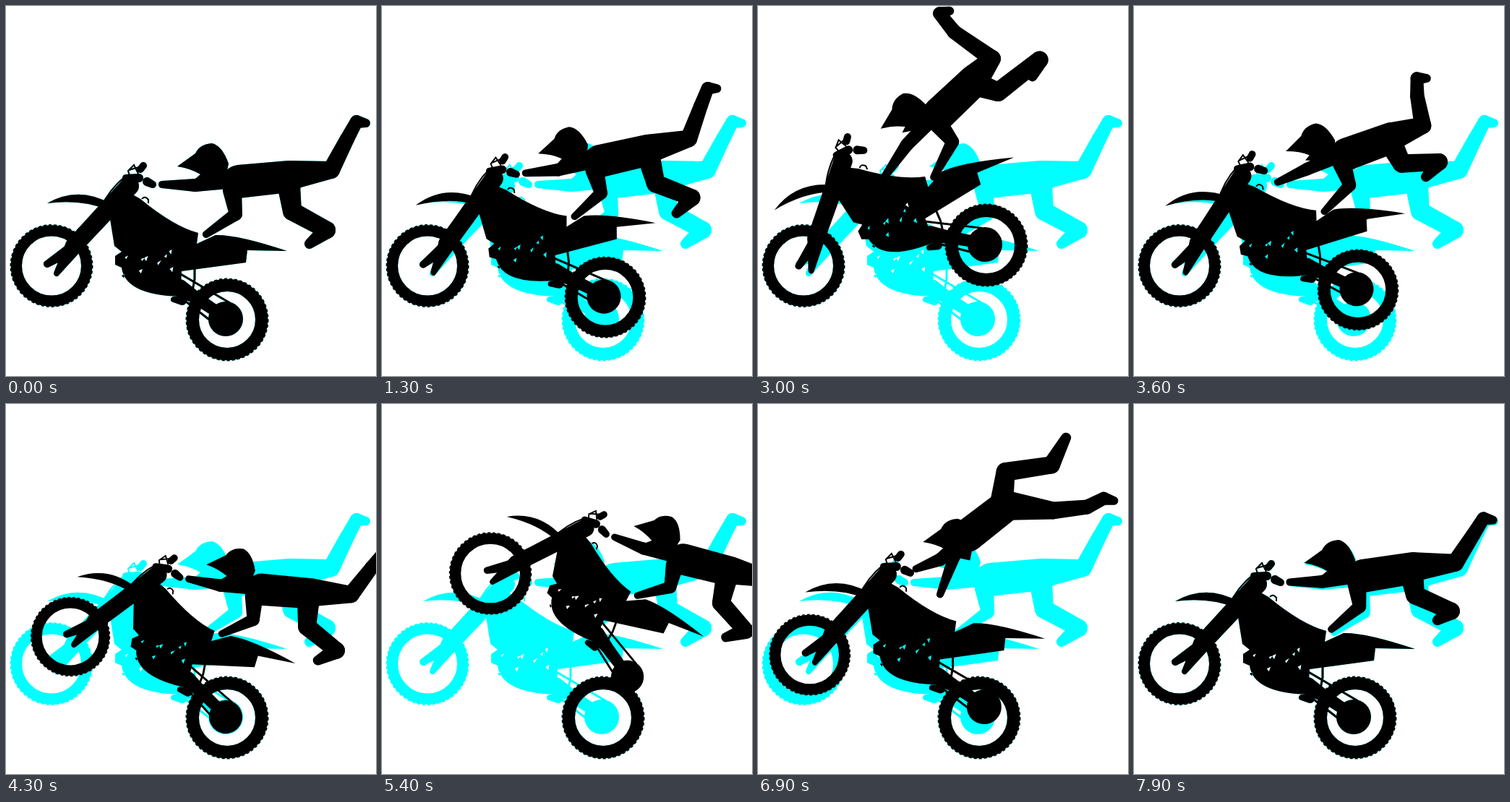
An HTML page with a canvas that plays this animation: 512x512 px, repeating every 8000 ms.

```html
<!DOCTYPE html>
<html lang="en">
<head>
<meta charset="utf-8">
<title>Motocross puppet</title>
<style>
html, body { margin: 0; width: 100%; height: 100%; overflow: hidden; background: #fff; }
canvas { display: block; width: 100vmin; height: 100vmin; }
</style>
</head>
<body>
<canvas id="stage" width="512" height="512"></canvas>
<script>
const ctx = document.getElementById('stage').getContext('2d');
const LOOP = 8000, STEP = 100, TURN = Math.PI * 2;
const FRONT = [63, 359.5], REAR = [306, 434], HUB = [304, 433];

// Bike at rest
const fender = new Path2D('M57 273Q100 248 146 274L140 282Q105 267 57 273Z');
const frame = new Path2D('M140 270L156 250L186 267Q232 305 266 314L264 329L290 317Q320 316 389 339L334 338L332 355L243 367L241 402Q165 400 160 362L151 358V346L160 340L150 332Z');
const cables = new Path2D('M99 310L130 281Q143 253 166 235M172 238L169 228L177 220L183 232M170 227L184 223M188 267Q192 262 197 268V273');
const bars = new Path2D('M240 370L310 411M240 402L289 440M261 364V378L258 394');
const bikeLimbs = [
  [[171, 249, 13], [94, 332, 12], [70, 370, 4]],   // fork
  [[94, 334, 9], [57, 357, 5]],                    // axle guard
  [[166, 238, 5], [184, 238, 6]],                  // triple clamp
  [[186, 226, 5], [190, 221, 5]],                  // lever
  [[195, 243, 6], [203, 247, 5]],                  // grip
  [[232, 406, 4], [244, 408, 6]],                  // foot peg
  [[240, 390, 12], [260, 402, 9], [296, 426, 8]]   // swing arm
];
const engine = new Path2D(frame);
engine.addPath(gaps(9));

// Rider at rest: chains of joints with their thickness
const helmet = new Path2D('M237 222L262 204Q268 191 285 190Q299 193 308 218L302 248L262 239L269 233Q256 225 237 222Z');
const HEAD = [280, 215];
const riderLimbs = [
  [[322, 243, 23], [392, 236, 22]],                                                // torso
  [[306, 243, 10], [262, 248, 9], [216, 247, 5]],                                  // front arm
  [[313, 255, 13], [318, 288, 9], [277, 316, 5]],                                  // back arm
  [[395, 234, 20], [450, 227, 12], [472, 184, 10], [485, 160, 9], [498, 162, 6]],  // raised leg
  [[391, 246, 16], [396, 284, 13], [444, 310, 12], [420, 329, 7]]                  // lower leg
];

// What drags the rider about; nearby joints follow most
const handles = [
  { swing: 0, at: [490, 160], drag: [-120, 4], reach: 64, bend: 0 },
  { swing: 0, at: [432, 322], drag: [5, -100], reach: 45, bend: 0 },
  { swing: 0, at: [212, 248], drag: [15, 45], reach: 40, bend: 0 },
  { swing: 1, at: [414, 330], drag: [0, -300], reach: 72, bend: -300 }
];

const dist = (a, b) => Math.hypot(a[0] - b[0], a[1] - b[1]);
const shift = ([x, y], dx, dy, k) => [x + dx * k, y + dy * k];
const ramp = (t, a, b, c, d) =>
  Math.max(0, Math.min(1, (t - a) / (b - a), (d - t) / (d - c)));

// Small see-through gaps scattered over the engine
function gaps(count) {
  let seed = 7;
  const rnd = (lo, hi) => lo + (seed = seed * 16807 % 2147483647) / 2147483647 * (hi - lo);
  const path = new Path2D();
  for (let i = 0; i < count; i++) {
    const x = rnd(160, 232), y = rnd(337, 376);
    path.moveTo(x, y);
    path.lineTo(x + rnd(3, 6), y - rnd(1, 4));
    path.lineTo(x + rnd(1, 4), y + rnd(2, 5));
    path.closePath();
  }
  return path;
}

function pull(joint, swings) {
  let x = 0, y = 0;
  for (const { swing, at, drag, reach, bend } of handles) {
    const near = Math.max(0, 1.09 / (1 + (dist(joint, at) / reach) ** 2) - 0.09);
    x += swings[swing] * near * (drag[0] + bend * (1 - near));
    y += swings[swing] * near * drag[1];
  }
  return [x, y];
}

function poseAt(t) {
  const lift = ramp(t, 1000, 2000, 3000, 4000);
  return {
    lift,
    front: shift(FRONT, 87, -125, ramp(t, 4000, 5000, 6000, 7000)),
    rear: shift(REAR, 10, -103, lift),
    hub: shift(shift(HUB, 10, -103, lift), 89, -139, ramp(t, 5000, 6000, 6000, 7000)),
    swings: [ramp(t, 2000, 3000, 3000, 4000), ramp(t, 6000, 7000, 7000, 8000)]
  };
}

// Turn and scale that carries the resting front-to-hub line to the posed one
function bikeMatrix({ front, hub }) {
  const ux = HUB[0] - FRONT[0], uy = HUB[1] - FRONT[1];
  const vx = hub[0] - front[0], vy = hub[1] - front[1];
  const len = ux * ux + uy * uy;
  const a = (ux * vx + uy * vy) / len, b = (ux * vy - uy * vx) / len;
  return [a, b, -b, a,
    front[0] - a * FRONT[0] + b * FRONT[1],
    front[1] - b * FRONT[0] - a * FRONT[1]];
}

// Tapered limb: the outline around each pair of neighbouring circles
function drawLimb(joints) {
  for (let i = 1; i < joints.length; i++) {
    const [x, y, r] = joints[i - 1], [u, v, s] = joints[i];
    const angle = Math.atan2(v - y, u - x);
    const ratio = (r - s) / Math.max(1, Math.hypot(u - x, v - y));
    const side = Math.acos(Math.max(-1, Math.min(1, ratio)));
    ctx.beginPath();
    ctx.arc(x, y, r, angle + side, angle - side + TURN);
    ctx.arc(u, v, s, angle - side, angle + side);
    ctx.fill();
  }
}

function drawWheel([x, y], scale, inner) {
  const ring = (r, width) => {
    ctx.lineWidth = width;
    ctx.beginPath();
    ctx.arc(0, 0, r, 0, TURN);
    ctx.stroke();
  };
  ctx.save();
  ctx.translate(x, y);
  ctx.scale(scale, scale);
  ring((56.3 + inner) / 2, 56.3 - inner);
  ctx.setLineDash([4, 3.1]);
  ring(56.7, 1.4);
  ctx.restore();
}

function drawBike(matrix) {
  ctx.save();
  ctx.transform(...matrix);
  ctx.fill(fender);
  ctx.fill(engine, 'evenodd');
  bikeLimbs.forEach(drawLimb);
  ctx.lineWidth = 2;
  ctx.stroke(cables);
  ctx.lineWidth = 3;
  ctx.stroke(bars);
  ctx.beginPath();
  ctx.arc(...HUB, 24, 0, TURN);
  ctx.fill();
  ctx.restore();
}

function drawRider(matrix, swings) {
  const [a, b, c, d, e, f] = matrix, scale = Math.hypot(a, b);
  for (const limb of riderLimbs) {
    drawLimb(limb.map(([x, y, r]) => {
      const [px, py] = pull([x, y], swings);
      return [a * x + c * y + e + px, b * x + d * y + f + py, r * scale];
    }));
  }
  ctx.save();
  ctx.translate(...pull(HEAD, swings));
  ctx.transform(...matrix);
  ctx.fill(helmet);
  ctx.restore();
}

function drawAll(pose, colour) {
  ctx.fillStyle = ctx.strokeStyle = colour;
  const matrix = bikeMatrix(pose);
  const scale = dist(pose.front, pose.rear) / dist(FRONT, REAR);
  drawWheel(pose.front, pose.lift > 0 ? 1 : scale, 41);
  drawWheel(pose.rear, pose.lift > 0 ? scale : 1, 39);
  drawBike(matrix);
  drawRider(matrix, pose.swings);
}

const rest = poseAt(0);

function tick() {
  const t = Math.floor(performance.now() % LOOP / STEP) * STEP;
  ctx.fillStyle = '#fff';
  ctx.fillRect(0, 0, 512, 512);
  drawAll(rest, '#0ff');
  drawAll(poseAt(t), '#000');
  requestAnimationFrame(tick);
}
tick();
</script>
</body>
</html>
```
